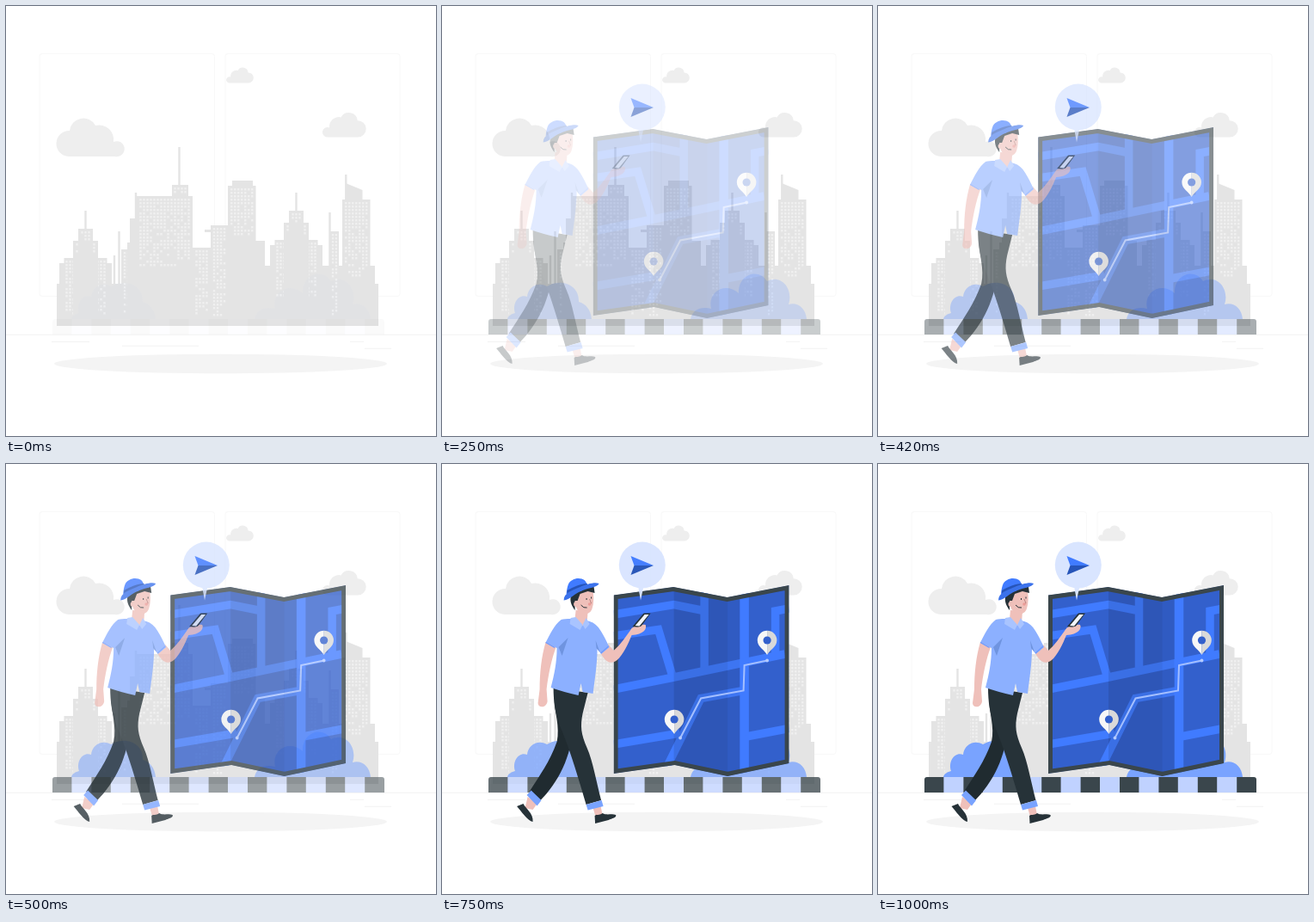
Animation, 500 px wide and 500 px high, one loop 1.04 s. Source, as an HTML page:

```html
<!DOCTYPE html>
<html lang="en">
<head>
<meta charset="utf-8">
<title>City walk with a map</title>
<style>
html, body { margin: 0; width: 100%; height: 100%; overflow: hidden; background: #fff; }
svg { display: block; width: 100vw; height: 100vh; }
</style>
</head>
<body>
<svg viewBox="0 0 500 500">
  <defs>
    <path id="sheet" d="M198 152.5 267.500 143 330 155 402 141V348L330.500 363 269 350 198 360Z"/>
    <clipPath id="paper"><use href="#sheet"/></clipPath>
    <g id="pin">
      <path d="M0 17C-3 11-11.300 8-11.300 0A11.300 11.300 0 0 1 0-11.300Z" fill="#f7f7f7"/>
      <path d="M0 17C3 11 11.300 8 11.300 0A11.300 11.300 0 0 0 0-11.300Z" fill="#d9d9d9"/>
      <circle r="4.600" fill="#3360cc"/>
    </g>
    <path id="cloud" fill="#eee" d="M15 46A15 15 0 1 1 16 16A16 16 0 0 1 46 10A17 17 0 0 1 67 29A9 9 0 1 1 69 46Z"/>
  </defs>

  <g fill="none" stroke="#f8f8f8">
    <rect x="39" y="55.500" width="203.500" height="282" rx="3"/>
    <rect x="255" y="55.500" width="203" height="282" rx="3"/>
  </g>
  <path d="M0 382.300H500M400 390.300H416M417 398.300H448M53 390.500H97M135 395.300H224" stroke="#efefef" stroke-width=".8"/>
  <ellipse cx="249.500" cy="416" rx="193.500" ry="11.300" fill="#f4f4f4"/>
  <use href="#cloud" transform="translate(58 129)"/>
  <use href="#cloud" transform="translate(288 71) scale(-.4 .4)"/>
  <use href="#cloud" transform="translate(419 123) scale(-.64 .64)"/>
  <g id="city"></g>

  <g id="street">
    <g fill="#79a3ff">
      <path d="M76 364C77 360 81 358 85 357C81 345 90 334 99 338C100 326 112 320 122 326C138 316 160 324 159 344C167 346 173 353 174 364Z"/>
      <path d="M289 364C291 352 303 349 313 352C308 332 330 320 345 334C344 312 368 304 378 320C395 311 409 330 403 347C414 344 423 352 424 364Z"/>
    </g>
    <path d="M54 382V367Q54 364 57 364H437Q440 364 440 367V382Z" fill="#3a464c"/>
    <path id="stripes" fill="#c0d2ff"/>
  </g>

  <g id="map">
    <g clip-path="url(#paper)">
      <use href="#sheet" fill="#3360cc"/>
      <g fill="none" stroke="#407bff" stroke-width="9.500">
        <path d="M198 175 268 163.500 300 170M303.500 145V241"/>
        <path d="M350 145V360" stroke-width="10.500"/>
        <path d="M198 200 250 192.500 266.500 247"/>
        <path d="M198 262 268 248 397 221"/>
        <path d="M198 326 275 313M260 352 299.500 272.500 349 263.500"/>
        <path d="M352 317 402 307.500M386 223V171L402 168"/>
      </g>
      <path d="M268 140H330.500V365H268Z" opacity=".1"/>
      <path d="M330.500 140H344.500V365H330.500Z" opacity=".05"/>
      <use href="#sheet" fill="none" stroke="#3a464c" stroke-width="10"/>
    </g>
    <path d="M275.500 318.500 299.500 272.500 349 263.500 350 234 376.500 228.500" fill="none" stroke="#a4bfff" stroke-width="2"/>
    <g fill="#b3caff"><circle cx="275.500" cy="318.500" r="1.900"/><circle cx="376.500" cy="228.500" r="1.900"/></g>
    <use href="#pin" x="268.500" y="297"/>
    <use href="#pin" x="376.500" y="205"/>
  </g>

  <g id="bubble">
    <path d="M228 142 231 158.500 234.500 142Z" fill="#d9e5ff"/>
    <circle cx="232.800" cy="117.600" r="27" fill="#d9e5ff"/>
    <path d="M219.500 107 246 118H223.500Z" fill="#407bff"/>
    <path d="M219.500 129 246 118H223.500Z" fill="#2654b8"/>
  </g>

  <g id="man">
    <!-- arms, ankles and phone -->
    <g fill="#efc0ba">
      <path d="M119 207 131 213C126 226 122 245 120 262L121 276C120 284 110 284 110 278L112 262C112 243 114 224 119 207Z"/>
      <path d="M181 216 192 210 198 217C206 210 212 201 217 194C220 188 229 186 235 187C237 192 233 198 219 199C215 209 209 222 202 228C192 236 185 225 181 216Z"/>
      <path d="M98 387 109 395 104 402 95 400ZM174 400 183 398 185 408 177 410Z"/>
    </g>
    <path d="M220 189 233 173.500 241 173.500 229 190Z" fill="#263238"/>
    <path d="M223 188 234 175 239 175 228 188.500Z" fill="#f4f6fc"/>
    <path d="M219 192Q226 192 235 188" fill="none" stroke="#efc0ba" stroke-width="2.500"/>

    <!-- shoes, trousers and cuffs -->
    <path d="M85.500 398 93 395C95 400 105 406 104 416C98 415 90 403 85.500 398ZM176 409C178 407 181 409 185 406C190 409 196 406 200.500 408C202 411 196 412 192 414L176.500 418Z" fill="#263238"/>
    <path d="M129 270C129 290 136 305 132 323C124 346 112 362 100 381L112 392C134 370 149 340 151 304Z" fill="#202b30"/>
    <path d="M128 260C128 276 130 291 136 306C145 327 153 351 166 396L183.500 391C178 370 174 346 167 330C160 314 159 305 162 290L168 266Z" fill="#263238"/>
    <path d="M97 385 102 379.500 114 391 109 397.500ZM166 396 184 391 186 398 168 402.500Z" fill="#79a3ff"/>

    <!-- shirt, neck and collar -->
    <path d="M137 181C145 179 160 180 170 183C181 186 186 199 193 213L183.500 221 179 215C179 232 176 251 174 267L162 265 160 255 157 269Q139 265 125 260C129 245 132 230 132 214L119 207.500C124 198 129 187 137 181Z" fill="#8cb0ff"/>
    <path d="M134 213 145 202 138 223ZM178 214 177 205 182 219Z" fill="#6f94e0"/>
    <path d="M119 207.500 129.500 213.500M183 220 192 212" stroke="#6d9aff" stroke-width="1.300"/>
    <path d="M154 170 168 171 167 185 162 188 153 180Z" fill="#efc0ba"/>
    <path d="M148 179 154 178 162 187 159 193 147 186ZM166 179 170 186 165 192 162 187Z" fill="#a9c4ff"/>

    <!-- head and hat -->
    <path d="M153 151C162 147 170 146 174 148C175 154 175 162 173 168C171 175 163 176 158 172C154 169 152 160 153 151Z" fill="#efc0ba"/>
    <path d="M148 155C151 146 164 141 175 143L176 150 168 148 159 151 156 159 153 159 153 170C150 166 147 161 148 155Z" fill="#263238"/>
    <circle cx="154.500" cy="163" r="3" fill="#efc0ba"/>
    <path d="M160 164Q163 168 167 167M166.500 156V158M172 154.500V156.500" fill="none" stroke="#263238"/>
    <path d="M170 157 172 162 169 163" fill="none" stroke="#a56b68" stroke-width=".7"/>
    <circle cx="170" cy="163" r="1.800" fill="#eb9c98"/>
    <path d="M143 151C144 143 145 137 150 135C155 132 161 133 164 135C166 137 167 139 168 142L160 148Z" fill="#407bff"/>
    <path d="M144 147C151 143 160 139 167 139L169 143 144 152Z" fill="#2654b8"/>
    <path d="M140 158.500C140 150 149 147 159 143C166 140 176 137 181 139C180 143 169 144 162 147C153 150 147 158 140 158.500Z" fill="#3b72eb"/>
  </g>
</svg>

<script>
const el = id => document.getElementById(id);
const FRAME = 1000 / 24, LOOP = 1040, GROUND = 372;

const box = (x, y, w, h) => `M${x} ${y}h${w}v${h}h${-w}z`;

function fill(d, color) {
  const p = document.createElementNS("http://www.w3.org/2000/svg", "path");
  p.setAttribute("d", d);
  p.setAttribute("fill", color);
  el("city").append(p);
}

let seed = 7;
const rand = () => (seed = seed * 16807 % 2147483647) / 2147483647;

// A building down to the ground, with rows of windows that thin out downwards
function block(x, top, w, rows = 0) {
  fill(box(x, top, w, GROUND - top), "#e4e4e4");
  const cols = Math.floor((w - 2) / 4), edge = (w - cols * 4 + 1.6) / 2;
  let lit = "";
  for (let r = 0; r < rows; r++)
    for (let c = 0; c < cols; c++)
      if (rand() > .5 * r / rows) lit += box(x + edge + c * 4, top + 3 + r * 4, 2.4, 2.4);
  fill(lit, "#f0f0f0");
}

const mast = (x, top, h) => fill(box(x - 1.2, top, 2.4, h), "#e4e4e4");

// Stepped tower, widest tier first
function tower(cx, top) {
  for (const [half, drop, rows] of [[30.5, 40, 0], [25, 34, 16], [14.5, 14, 4], [8.5, 0, 3]])
    block(cx - half, top + drop, half * 2, rows);
  mast(cx, top - 21, 21);
}

block(59, 323, 374);
block(301, 302, 128);
tower(92.5, 259);
tower(337.5, 238);
mast(126, 290, 40);
mast(131.5, 262, 70);
block(134, 283, 20, 19);
block(141, 275, 20);
block(144, 247, 20);
mast(151, 217, 30);
block(193, 208, 19, 2);
block(152, 221, 65, 20);
mast(201.5, 164, 45);
block(217, 281, 21, 19);
fill(box(231, 260, 8, 3), "#e4e4e4");
block(238, 255, 20, 26);
block(263, 203, 24);
block(258, 209, 32.5, 14);
block(290, 273, 11);
mast(376.5, 240, 63);
block(377, 262, 10, 24);
block(391, 225, 32.5, 22);
mast(395.3, 196, 30);
fill("M395 206 414.5 214V226H395Z", "#e4e4e4");

let stripes = "";
for (let i = 0; i < 8; i++) stripes += box(76.4 + i * 45.4, 364, 23, 18);
el("stripes").setAttribute("d", stripes);

const bez = (a, b, s) => 3 * (1 - s) ** 2 * s * a + 3 * (1 - s) * s * s * b + s ** 3;

function overshoot(u) {
  let lo = 0, hi = 1;
  for (let i = 0; i < 24; i++) {
    const mid = (lo + hi) / 2;
    if (bez(.36, .5, mid) < u) lo = mid; else hi = mid;
  }
  return bez(-.01, 1.38, lo);
}

function draw(now) {
  const i = Math.floor((now % LOOP + 5) / FRAME);
  const u = i < 2 ? .02 : Math.min(1, i / 24 + .015);
  const y = overshoot(u);
  el("street").setAttribute("opacity", u);
  el("bubble").setAttribute("opacity", Math.max(0, Math.min(1, i < 2 ? 0 : 1 - (1 - u) ** 2.5)));
  for (const id of ["map", "man"]) {
    el(id).setAttribute("opacity", Math.max(0, Math.min(1, y)));
    el(id).setAttribute("transform", `translate(${30 * (y - 1)} 0)`);
  }
}

const start = performance.now();
function tick() {
  draw(performance.now() - start);
  requestAnimationFrame(tick);
}
tick();
</script>
</body>
</html>
```
